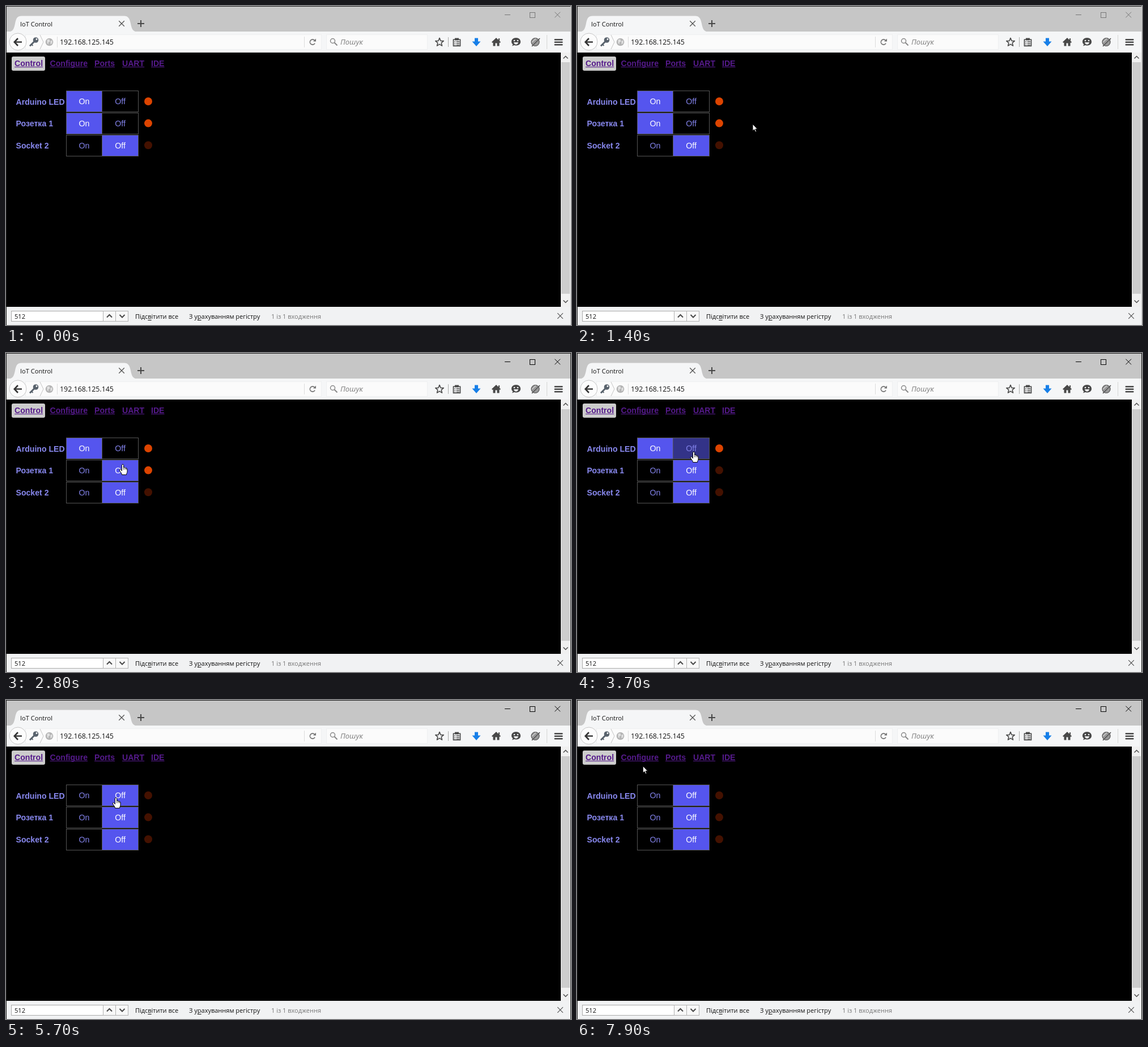
An HTML page with a canvas for the animation above (8 s loop, 997 by 562 pixels).

```html
<!DOCTYPE html>
<html lang="uk">
<head>
<meta charset="utf-8">
<title>IoT Control</title>
<style>
html, body { margin: 0; width: 100%; height: 100%; overflow: hidden; background: #000; }
canvas { display: block; }
</style>
</head>
<body>
<canvas id="stage" width="997" height="562"></canvas>
<script>
const W = 997, H = 562, LOOP = 8000;
const UI = '"Open Sans", "Noto Sans", sans-serif';
const PAGE = '"Liberation Sans", Arial, sans-serif';
const INK = '#484848';

const stage = document.getElementById('stage').getContext('2d');
const backdrop = document.createElement('canvas');
backdrop.width = W;
backdrop.height = H;
let c = backdrop.getContext('2d');

function box(x, y, w, h, fill) {
  c.fillStyle = fill;
  c.fillRect(x, y, w, h);
}

function frame(x, y, w, h, color) {
  c.strokeStyle = color;
  c.lineWidth = 1;
  c.strokeRect(x + 0.5, y + 0.5, w - 1, h - 1);
}

function pill(x, y, w, h, r, fill) {
  c.beginPath();
  c.roundRect(x, y, w, h, r);
  c.fillStyle = fill;
  c.fill();
}

function disc(x, y, r, fill) {
  c.beginPath();
  c.arc(x, y, r, 0, Math.PI * 2);
  c.fillStyle = fill;
  c.fill();
}

function ring(x, y, r, color, width = 1) {
  c.beginPath();
  c.arc(x, y, r, 0, Math.PI * 2);
  c.strokeStyle = color;
  c.lineWidth = width;
  c.stroke();
}

function line(color, width, ...points) {
  c.beginPath();
  for (let i = 0; i < points.length; i += 2) c.lineTo(points[i], points[i + 1]);
  c.strokeStyle = color;
  c.lineWidth = width;
  c.stroke();
}

function cross(x, y, r, color, width = 1) {
  line(color, width, x - r, y - r, x + r, y + r);
  line(color, width, x + r, y - r, x - r, y + r);
}

function shape(d, x, y, fill, stroke, width = 1) {
  const path = new Path2D(d);
  c.save();
  c.translate(x, y);
  c.lineJoin = 'round';
  if (fill) { c.fillStyle = fill; c.fill(path); }
  if (stroke) { c.strokeStyle = stroke; c.lineWidth = width; c.stroke(path); }
  c.restore();
}

function text(str, x, y, font, color, align = 'left') {
  c.font = font;
  c.fillStyle = color;
  c.textAlign = align;
  c.fillText(str, x, y);
  return c.measureText(str).width;
}

function accessText(before, key, after, x, y) {
  const font = '11px ' + UI;
  const start = x + text(before, x, y, font, '#111');
  const end = start + text(key, start, y, font, '#111');
  box(start, y + 2, end - start, 1, '#111');
  text(after, end, y, font, '#111');
}

function drawTabs() {
  box(0, 0, W, 45, '#c6c6c6');
  box(0, 45, W, 37, '#f5f6f7');
  shape('M3 46C13 45 14 40 16 31C18 21 20 17.500 28 17.500H208C216 17.500 218 22 220 31C222 40 223 45 233 46Z', 0, 0, '#f5f6f7');
  text('IoT Control', 25, 36, '11.1px ' + UI, '#111');
  cross(204, 31, 4.8, '#555', 1.3);
  box(232, 30, 12, 2, INK);
  box(237, 25, 2, 12, INK);
}

function drawToolbar() {
  box(34, 50, 523, 27, '#fbfbfb');
  frame(34, 50, 523, 27, '#eeeff0');
  box(565, 50, 179, 27, '#fbfbfb');
  frame(565, 50, 179, 27, '#eeeff0');

  disc(21, 63, 15, '#fcfcfc');
  ring(21, 63, 15, '#c6c6c6');
  line('#333', 2.4, 28, 63.5, 15.5, 63.5);
  line('#333', 2.6, 21, 57, 14.8, 63.5, 21, 70);

  // Key, identity arrow and page globe
  disc(52.5, 60, 4.8, '#59636d');
  line('#59636d', 3, 50, 62.5, 42, 70.5);
  line('#59636d', 2, 44.5, 67, 47.5, 70);
  disc(54, 58.5, 1.4, '#fbfbfb');
  line('#c4c4c4', 1, 60, 51, 66, 63.5, 60, 76);
  disc(76.5, 63.5, 6.8, '#b4b4b4');
  shape('M-4 -4L0 -5L1 -1L-2 1L-1 4L-4 2ZM2 -2L5 -3L5 2L2 4Z', 76.5, 63.5, '#e2e2e2');
  box(90, 54, 1, 19, '#ddd');
  text('192.168.125.145', 95, 68, '12.4px ' + UI, '#111');
  box(526, 54, 1, 19, '#ddd');

  c.beginPath();
  c.arc(541, 63.5, 4.6, 0.5, 5.6);
  c.strokeStyle = '#777';
  c.lineWidth = 1.7;
  c.stroke();
  shape('M1 -1H6V-6Z', 541, 63.5, '#777');

  ring(576.5, 61.5, 4, '#888', 1.5);
  line('#888', 2, 579.5, 64.5, 584.5, 69.5);
  text('Пошук', 590, 68, 'italic 13px ' + UI, '#7e7e7e');
  drawActions();
}

function drawActions() {
  const star = Array.from({ length: 10 }, (_, i) => {
    const r = i % 2 ? 3.3 : 7.6, a = i * Math.PI / 5 - Math.PI / 2;
    return `${r * Math.cos(a)} ${r * Math.sin(a)}`;
  });
  shape('M' + star.join('L') + 'Z', 765, 64, null, INK, 1.6);
  box(780, 55, 1, 17, '#aaa');

  shape('M-6 -5H6V6.500H-6Z', 795.5, 64, null, INK, 1.7);
  box(792, 56.5, 7, 4, INK);
  for (const y of [62, 65, 68]) {
    box(791.5, y, 1.5, 1.4, INK);
    box(794.5, y, 5.5, 1.4, INK);
  }

  shape('M-3 -7H3V-1H7.500L0 7.500L-7.500 -1H-3Z', 830, 63.5, '#177fe8');
  shape('M0 -7.500L8 0L6.500 1.500L5.500 .7V7H1.500V2H-1.500V7H-5.500V.7L-6.500 1.500L-8 0Z', 865, 63.5, INK);
  box(869, 57, 2, 4, INK);

  shape('M0 -7.500C5 -7.500 8 -4.500 8 -.5C8 3.500 5 6 0 6C-1 6 -2 6 -3 5.500L-7 7L-5.500 4C-7 3 -8 1.500 -8 -.5C-8 -4.500 -5 -7.500 0 -7.500Z', 900, 63.5, INK);
  disc(897, 61, 1.3, '#f5f6f7');
  disc(903, 61, 1.3, '#f5f6f7');
  shape('M-4 0H4C3 5 -3 5 -4 0Z', 900, 64, '#f5f6f7');

  disc(934, 63.5, 7.2, '#999');
  ring(934, 63.5, 7, '#555', 1.2);
  line('#f5f6f7', 1.3, 930, 69, 940, 59);
  line('#f5f6f7', 1, 928, 64, 935, 57.5);
  line(INK, 1.6, 928, 71, 942, 57);

  box(954, 51, 1, 25, '#d5d5d5');
  for (const y of [58, 62.5, 67]) pill(967.5, y, 15, 2.6, 1, INK);
}

function drawNav() {
  pill(10, 89, 59, 25, 3, '#ccc');
  const links = [['Control', 15], ['Configure', 77.5], ['Ports', 156], ['UART', 205], ['IDE', 256]];
  for (const [name, x] of links) {
    const w = text(name, x, 106, 'bold 14.1px ' + PAGE, '#551a8b');
    box(x, 107, w, 1, '#551a8b');
  }
}

function drawScrollbar() {
  box(979, 82, 17, 448, '#f0f0f0');
  box(980, 99, 15, 408, '#cdcdcd');
  line('#505050', 1.5, 983.5, 92.5, 987.5, 88.5, 991.5, 92.5);
  line('#505050', 1.5, 983.5, 518.5, 987.5, 522.5, 991.5, 518.5);
}

function drawFindBar() {
  box(0, 530, W, 32, '#f1f2f3');
  box(9, 537, 163, 19, '#fff');
  frame(9, 537, 163, 19, '#aaa');
  for (const x of [171, 193]) {
    box(x, 537, 23, 19, '#f8f8f8');
    frame(x, 537, 23, 19, '#b2b2b2');
  }
  line(INK, 2, 178, 548.5, 182.5, 544, 187, 548.5);
  line(INK, 2, 200.5, 544, 205, 548.5, 209.5, 544);
  text('512', 15, 551, '11.1px ' + UI, '#111');
  accessText('Підс', 'в', 'ітити все', 228, 551);
  accessText('З у', 'р', 'ахуванням регістру', 323, 551);
  text('1 із 1 входження', 468, 551, '11px ' + UI, '#777');
  cross(978, 546, 4.8, '#555', 1.2);
}

function drawBackdrop() {
  box(0, 0, W, H, '#000');
  drawTabs();
  drawToolbar();
  drawNav();
  drawScrollbar();
  drawFindBar();
  box(0, 0, W, 1, '#1c1c1c');
  box(0, 0, 1, H, '#1c1c1c');
}

// Each row: label, top, time switched off, time its lamp goes dark
const rows = [
  { label: 'Arduino LED', y: 149, off: 4000, dark: 4300 },
  { label: 'Розетка 1', y: 188, off: 2100, dark: 2900 },
  { label: 'Socket 2', y: 227, off: 0, dark: 0 }
];
const PITCH = 38.6;
const ON = { x: 106, w: 64 }, OFF = { x: 169, w: 65 };

// Pointer stops: time, x, y; each holds until the next
const stops = [
  [100, 667, 102], [900, 405, 190], [1000, 386, 200], [1100, 382, 202],
  [1300, 364, 204], [1400, 310, 208], [1500, 254, 210], [1600, 217, 209],
  [1700, 206, 208], [2000, 203, 208], [2200, 205, 203],
  [2800, 206, 196], [2900, 206, 193], [3000, 206, 189], [3100, 206, 184],
  [3200, 207, 180], [3300, 207, 177], [3400, 208, 175], [3600, 208, 173],
  [3700, 206, 174], [5700, 194, 172],
  [7000, 186, 160], [7100, 164, 142], [7200, 130, 127], [7300, 116.3, 121.5],
  [7800, 116.3, 119], [7900, 116.3, 116.3]
];

const ARROW = 'M0 0V12.200L2.800 9.600L4.800 14L6.700 13.200L4.800 8.900H8.500Z';
const HAND = 'M-1.600 1.500C-1.600 -.3 1.600 -.3 1.600 1.500V6C2 5 4.200 5.200 4.200 6.700C5 5.800 6.500 6.200 6.500 7.700C7.200 7.200 8 7.800 8 9V13C8 15 6.500 16 6.500 18.500H-1.500C-1.500 16 -4 14 -5.500 11C-6.500 9 -4.500 8 -3 9.800L-1.600 11.500Z';

function inside(p, b, y) {
  return p.x >= b.x && p.x < b.x + b.w && p.y >= y && p.y < y + 38;
}

function drawButton(label, b, y, selected, hovered) {
  box(b.x, y, b.w, 38, selected ? '#5555ee' : hovered ? '#333388' : '#000');
  frame(b.x, y, b.w, 38, '#555');
  text(label, b.x + b.w / 2, y + 24, '14.2px ' + PAGE, selected ? '#fff' : '#8282ea', 'center');
}

function drawRow(row, index, t, p) {
  const isOff = t >= row.off;
  const middle = 168 + PITCH * index;
  text(row.label, 17.5, Math.round(middle + 5.6), 'bold 14.1px ' + PAGE, '#8888ee');
  drawButton('On', ON, row.y, !isOff, p && inside(p, ON, row.y));
  drawButton('Off', OFF, row.y, isOff, p && inside(p, OFF, row.y));
  disc(251, middle, 7, t >= row.dark ? '#441100' : '#dd4400');
}

function drawWindowState(t) {
  const color = t >= 2000 ? '#000' : '#777';
  if (t >= 100 && t < 900) box(905, 1, 46, 29, '#b5b5b5');
  box(880, 15, 10, 1, color);
  frame(924, 11, 10, 10, color);
  cross(973.2, 15.5, 4.8, color);
  box(996, 0, 1, H, t < 1500 ? '#d0d0d0' : '#1c1c1c');
}

function drawPointer(p) {
  const over = rows.some(r => inside(p, ON, r.y) || inside(p, OFF, r.y));
  shape(over ? HAND : ARROW, p.x, p.y, '#fff', '#000', 1);
  if (over) {
    for (const x of [1.6, 4.2, 6.5]) line('#000', 0.8, p.x + x, p.y + 6.5, p.x + x, p.y + 9.5);
  }
}

function draw(now) {
  const t = now % LOOP;
  const stop = stops.findLast(s => s[0] <= t);
  const p = stop && { x: stop[1], y: stop[2] };
  c.drawImage(backdrop, 0, 0);
  drawWindowState(t);
  rows.forEach((row, i) => drawRow(row, i, t, p));
  if (p) drawPointer(p);
}

drawBackdrop();
c = stage;
const start = performance.now();
function tick() {
  draw(performance.now() - start);
  requestAnimationFrame(tick);
}
tick();
</script>
</body>
</html>
```
